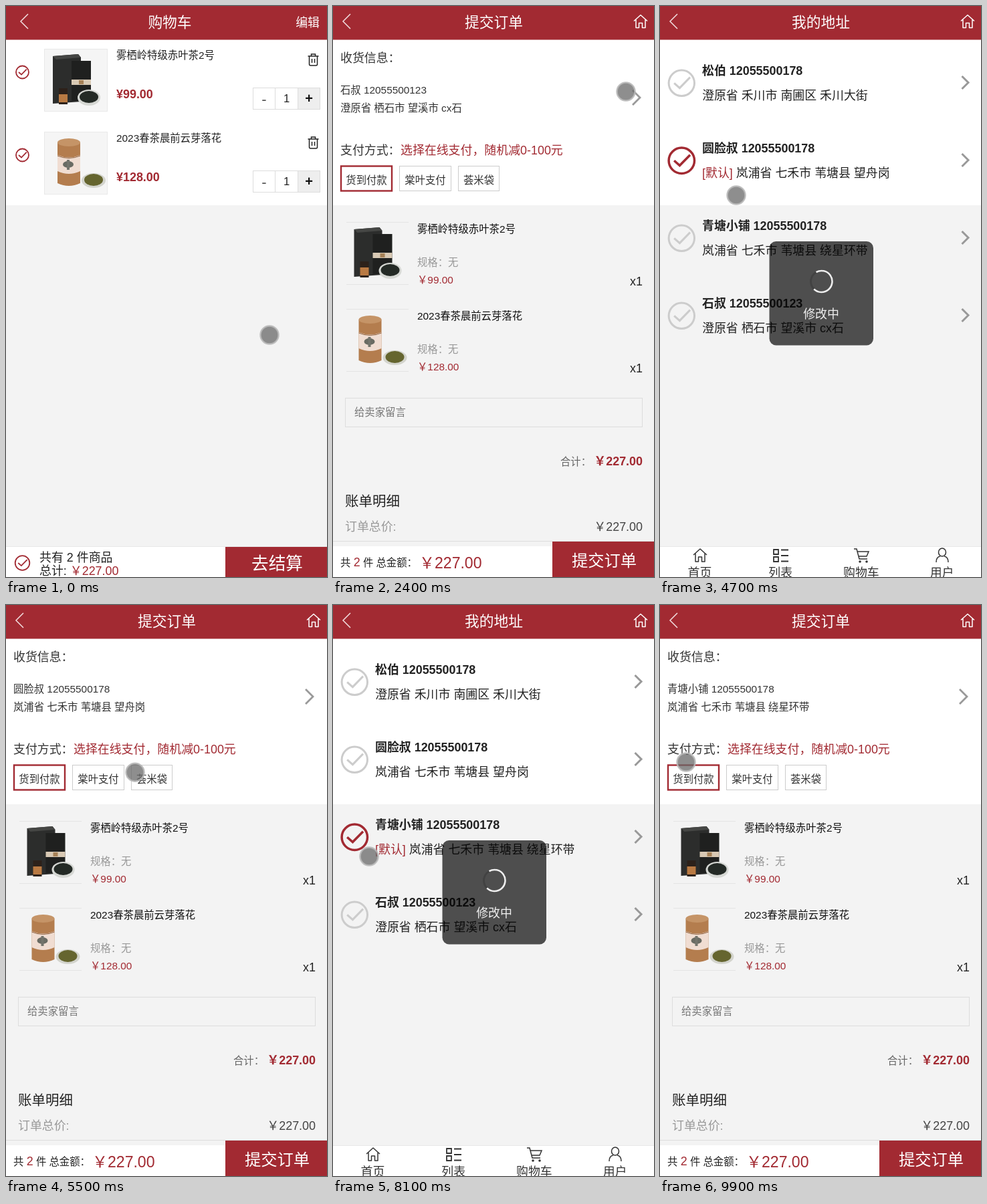
These frames come from a looping animation (480x854 px, 10 s). An HTML page:

```html
<!DOCTYPE html>
<html lang="zh-CN">
<head>
<meta charset="utf-8">
<title>购物车</title>
<style>
html, body { margin: 0; width: 100%; height: 100%; overflow: hidden; background: #f3f3f3; }
svg { display: block; width: 480px; height: 854px; }
text { font-family: "Liberation Sans", "Noto Sans CJK SC", "Noto Sans CJK", sans-serif; }
</style>
</head>
<body>
<svg id="stage" viewBox="0 0 480 854"></svg>
<script>
const RED = '#a22a32', INK = '#222', PAGE = '#f3f3f3';
// Type sizes of the mobile layout
const S = 15.36, M = 17.92, L = 20.48, XL = 21.76;

const text = (x, cy, size, str, fill = INK, more = '') =>
  `<text x="${x}" y="${cy + size * 0.37}" font-size="${size}" fill="${fill}" ${more}>${str}</text>`;
const rect = (x, y, w, h, fill, more = '') =>
  `<rect x="${x}" y="${y}" width="${w}" height="${h}" fill="${fill}" ${more}/>`;
const line = (d, stroke, width = 1.5, more = '') =>
  `<path d="${d}" fill="none" stroke="${stroke}" stroke-width="${width}" ${more}/>`;
const ellipse = (cx, cy, rx, ry, fill, more = '') =>
  `<ellipse cx="${cx}" cy="${cy}" rx="${rx}" ry="${ry}" fill="${fill}" ${more}/>`;
const at = (x, y, body) => `<g transform="translate(${x} ${y})">${body}</g>`;
const group = (id, body) => `<g id="${id}">${body}</g>`;
const BOLD = 'font-weight="700"', END = 'text-anchor="end"', MID = 'text-anchor="middle"';

const products = [
  { name: '雾栖岭特级赤叶茶2号', price: '99.00', photo: teaBox },
  { name: '2023春茶晨前云芽落花', price: '128.00', photo: teaCan },
];
const contacts = [
  { name: '松伯', phone: '12055500178', address: '澄原省 禾川市 南圃区 禾川大街' },
  { name: '圆脸叔', phone: '12055500178', address: '岚浦省 七禾市 苇塘县 望舟岗' },
  { name: '青塘小铺', phone: '12055500178', address: '岚浦省 七禾市 苇塘县 绕星环带' },
  { name: '石叔', phone: '12055500123', address: '澄原省 栖石市 望溪市 cx石' },
];

function teaBox() {
  return '<path d="M13 11L51 8L55 13V79L13 82Z" fill="#2c2d2c"/>' +
    '<path d="M13 11L51 8L55 13L18 16Z" fill="#454644"/>' +
    rect(41, 18, 29, 60, '#1f201f') + rect(41, 46, 29, 8, '#d8c9b4') + rect(52, 47, 7, 6, '#a68157') +
    rect(22, 59, 13, 24, '#2d211a') + rect(22, 68, 13, 12, '#b97a43') +
    ellipse(67, 73, 17, 12, '#d6d8d4') + ellipse(67, 72, 14, 9, '#242a26');
}
function teaCan() {
  return '<path d="M20 16V77Q37 85 54 77V16Z" fill="#b47d4e"/>' +
    ellipse(37, 16, 17, 6, '#c59467') +
    '<path d="M20 35Q37 42 54 35V59Q37 67 20 59Z" fill="#f0ddd2"/>' +
    ellipse(36, 49, 8, 5, '#696b63') + rect(34, 42, 4, 15, '#73746c') +
    line('M20 36Q37 43 54 36', '#8e5e39', 1) +
    ellipse(74, 73, 18, 11, '#d3d4cd') + ellipse(74, 72, 14, 9, '#65652f');
}

const check = (cx, cy, r, color, width) => at(cx, cy,
  ellipse(0, 0, r, r, 'none', `stroke="${color}" stroke-width="${width}"`) +
  line(`M${-r * .58} 0L${-r * .15} ${r * .38}L${r * .66} ${-r * .45}`, color, width));
const homeIcon = (x, y, color) => at(x, y,
  line('M-10 -1L0 -10L10 -1M-7 -3V9H-2.5V2H2.5V9H7V-3', color, 1.5, 'stroke-linejoin="round"'));

const header = (title, backX) => rect(0, 0, 480, 50.5, RED) +
  line(`M${backX + 11} 12L${backX} 23L${backX + 11} 34`, '#f2dfe0') +
  text(title.length > 3 ? 240.5 : 245, 23.5, XL, title, '#fff', MID);

const trash = line('M-8 -5H8M-3 -5V-8H3V-5M-6 -5V7Q-6 9 -4 9H4Q6 9 6 7V-5M-2 -1V5M2 -1V5', '#222');

function stepper() {
  const cell = (x, w, fill) => rect(x, 122.5, w, 32, fill, 'stroke="#ddd"');
  return cell(369.5, 33, '#fff') + cell(402.5, 34, '#fff') + cell(436.5, 33, '#eee') +
    text(386, 139, 22, '-', '#555', MID) + text(419.5, 138, 16.6, '1', INK, MID) +
    text(453, 138, 20, '+', '#111', MID + ' ' + BOLD);
}

function cartPage() {
  const rows = products.map((p, i) => at(0, i * 124,
    check(24.5, 99, 9.5, RED, 1.8) +
    rect(57.5, 64.5, 94, 93, '#f5f5f5', 'stroke="#e9e9e9"') + at(57, 64, p.photo()) +
    text(165, 73, S, p.name) + text(165, 131, M, '¥' + p.price, RED, BOLD) +
    at(459.5, 80, trash) + stepper())).join('');
  return header('购物车', 22) + text(469, 24, M, '编辑', '#fff', END) + rows +
    rect(0, 808, 480, 46, '#fff') + line('M0 808.5H480', '#e8e8e8', 1) +
    check(24.5, 833, 10.8, RED, 1.8) +
    text(50, 824, M, '共有 2 件商品') +
    text(50, 844, M, `总计: <tspan fill="${RED}">￥227.00</tspan>`) +
    rect(328, 809, 152, 45, RED) + text(405.5, 834, 25.6, '去结算', '#fff', MID);
}

function payOption(x, w, label, active) {
  const border = active ? `stroke="${RED}" stroke-width="2.4"` : 'stroke="#ccc"';
  return rect(x + .5, 239.5, w, 37, '#fff', border) + text(x + w / 2 + .5, 260, S, label, '#333', MID);
}

function orderPage() {
  const rows = products.map((p, i) => at(0, i * 130,
    line('M20 323.5H113M20 416.5H113', '#e4e4e4', 1) + at(18.5, 323, p.photo()) +
    text(126, 333, S, p.name, '#111') + text(126, 383, S, '规格：无', '#999') +
    text(126, 409, S, '￥' + p.price, RED) + text(463, 411, M, 'x1', INK, END))).join('');
  return header('提交订单', 15) + homeIcon(460, 23.5, '#fff') +
    text(11, 77, M, '收货信息：', '#333') + group('receiver', '') +
    line('M448 126L459 137L448 148', '#999', 2.8) +
    text(11, 215, M, '支付方式：', '#333') + text(101, 215, M, '选择在线支付，随机减0-100元', RED) +
    payOption(11.5, 76, '货到付款', true) + payOption(99, 77, '棠叶支付') + payOption(187, 61, '荟米袋') +
    rows + rect(18.5, 586.5, 444, 43, 'none', 'stroke="#ddd"') +
    text(32, 607, S, '给卖家留言', '#777') +
    text(340, 681, S, '合计：', '#666') + text(463, 680, M, '￥227.00', RED, BOLD + ' ' + END) +
    text(18, 740, L, '账单明细') + text(18, 778, M, '订单总价:', '#999') +
    text(463, 778, M, '￥227.00', '#444', END) +
    line('M0 800.5H480', '#ddd', 1) + rect(0, 808, 328, 46, '#fff') +
    text(11, 832, S, `共 <tspan font-size="${M}" fill="${RED}">2</tspan> 件 总金额：`) +
    text(129, 832, 23.04, '￥227.00', RED) +
    rect(328, 801, 152, 53, RED) + text(405.5, 829, 24.32, '提交订单', '#fff', MID);
}

function navBar() {
  const ink = '#333';
  const list = line('M1 -8.5H12M1 0H12M1 8.5H12', ink, 1.8) +
    line('M-10 -9H-3V-2H-10ZM-10 2H-3V9H-10Z', ink, 1.8);
  const cart = line('M-11 -10H-7L-3 5H9M-6 -6H11L8 1H-4', ink) +
    ellipse(-2, 9, 1.8, 1.8, ink) + ellipse(8, 9, 1.8, 1.8, ink);
  const user = ellipse(0, -5, 5.5, 6, 'none', `stroke="${ink}" stroke-width="1.5"`) +
    line('M-9 10Q-9 2 -3 1M3 1Q9 2 9 10', ink);
  return rect(0, 808, 480, 46, '#fff') + line('M0 808.5H480', '#e8e8e8', 1) +
    homeIcon(60, 822, ink) + at(180, 822, list) + at(301, 822, cart) + at(422, 822, user) +
    ['首页', '列表', '购物车', '用户'].map((s, i) => text(59.5 + i * 120.7, 847, M, s, '#333', MID)).join('');
}

const addressPage = () => header('我的地址', 15) + homeIcon(460, 23.5, '#fff') + group('contacts', '') + navBar();

const contactRows = (defaultId, selectedId) => contacts.map((c, i) => at(0, i * 116,
  check(32.3, 115.3, 19.2, i === selectedId ? RED : '#ccc', i === selectedId ? 3.5 : 3) +
  text(63, 96.5, M, `${c.name} ${c.phone}`, INK, BOLD) +
  text(63, 133.5, M, (i === defaultId ? `<tspan fill="${RED}">[默认]</tspan> ` : '') + c.address) +
  line('M451.5 105L461 114.5L451.5 124', '#999', 3))).join('');

const receiverLines = c =>
  text(11, 125, S, `${c.name} ${c.phone}`, '#333') + text(11, 152, S, c.address, '#333');

const toast = rect(163.5, 352, 155.5, 155.5, '#000', 'rx="10" opacity=".68"') +
  ellipse(241.5, 412, 16, 16, 'none', 'stroke="#000" stroke-opacity=".15" stroke-width="3"') +
  group('spinner', line('M-8 -13.9A16 16 0 1 1 -11.3 11.3', '#eee', 2.6)) +
  text(241, 460, M, '修改中', '#f0f0f0', MID + ' font-weight="500"');

const $ = id => document.getElementById(id);
$('stage').innerHTML = rect(0, 0, 480, 854, PAGE) + rect(0, 50, 480, 248, '#fff') +
  group('cart', cartPage()) + group('order', orderPage()) + group('address', addressPage()) +
  group('toast', toast) +
  group('cursor', ellipse(0, 0, 13.5, 13.5, '#686868',
    'fill-opacity=".75" stroke="#b8b8b8" stroke-opacity=".85" stroke-width="2.5"'));

// Each scene: start, page, default contact, selected contact (shown with the toast)
const scenes = [
  [0, 'cart', 3], [1300, 'order', 3], [2700, 'address', 3], [4400, 'address', 1, 1],
  [5200, 'order', 1], [6600, 'address', 1], [7800, 'address', 2, 2], [8600, 'order', 2],
];
// Cursor stops: time, x, y
const path = [
  [0, 394, 492], [300, 394, 492], [800, 386, 765], [1000, 384, 832], [1300, 384, 832],
  [1500, 368, 674], [1700, 314, 517], [1900, 259, 318], [2100, 302, 182], [2300, 438, 128],
  [2700, 438, 128], [3100, 180, 160], [3400, 78, 198], [3800, 34, 230], [4400, 34, 230],
  [4700, 114, 283], [5200, 145, 290], [6300, 321, 144], [6600, 321, 144], [7100, 145, 290],
  [7500, 33, 348], [7800, 33, 348], [8100, 54, 376], [8600, 136, 318], [9300, 120, 180],
  [9900, 39, 235], [10000, 39, 235],
];

function cursorAt(t) {
  const i = path.findIndex(p => p[0] > t);
  const [t0, x0, y0] = path[i - 1], [t1, x1, y1] = path[i];
  const k = (t - t0) / (t1 - t0);
  return [x0 + (x1 - x0) * k, y0 + (y1 - y0) * k];
}

let shown;
function showScene(scene) {
  if (scene === shown) return;
  shown = scene;
  const [, page, defaultId, selectedId] = scene;
  for (const id of ['cart', 'order', 'address']) $(id).style.display = id === page ? '' : 'none';
  $('toast').style.display = selectedId === undefined ? 'none' : '';
  $('receiver').innerHTML = receiverLines(contacts[defaultId]);
  $('contacts').innerHTML = contactRows(defaultId, selectedId);
}

function draw() {
  const t = Math.floor(performance.now() % 10000 / 100) * 100;
  const scene = scenes.findLast(s => s[0] <= t);
  showScene(scene);
  $('cursor').setAttribute('transform', `translate(${cursorAt(t)})`);
  const turn = (t - scene[0] - 300) * 0.36;
  $('spinner').setAttribute('transform', `translate(241.5 412) rotate(${turn})`);
  requestAnimationFrame(draw);
}
draw();
</script>
</body>
</html>
```
